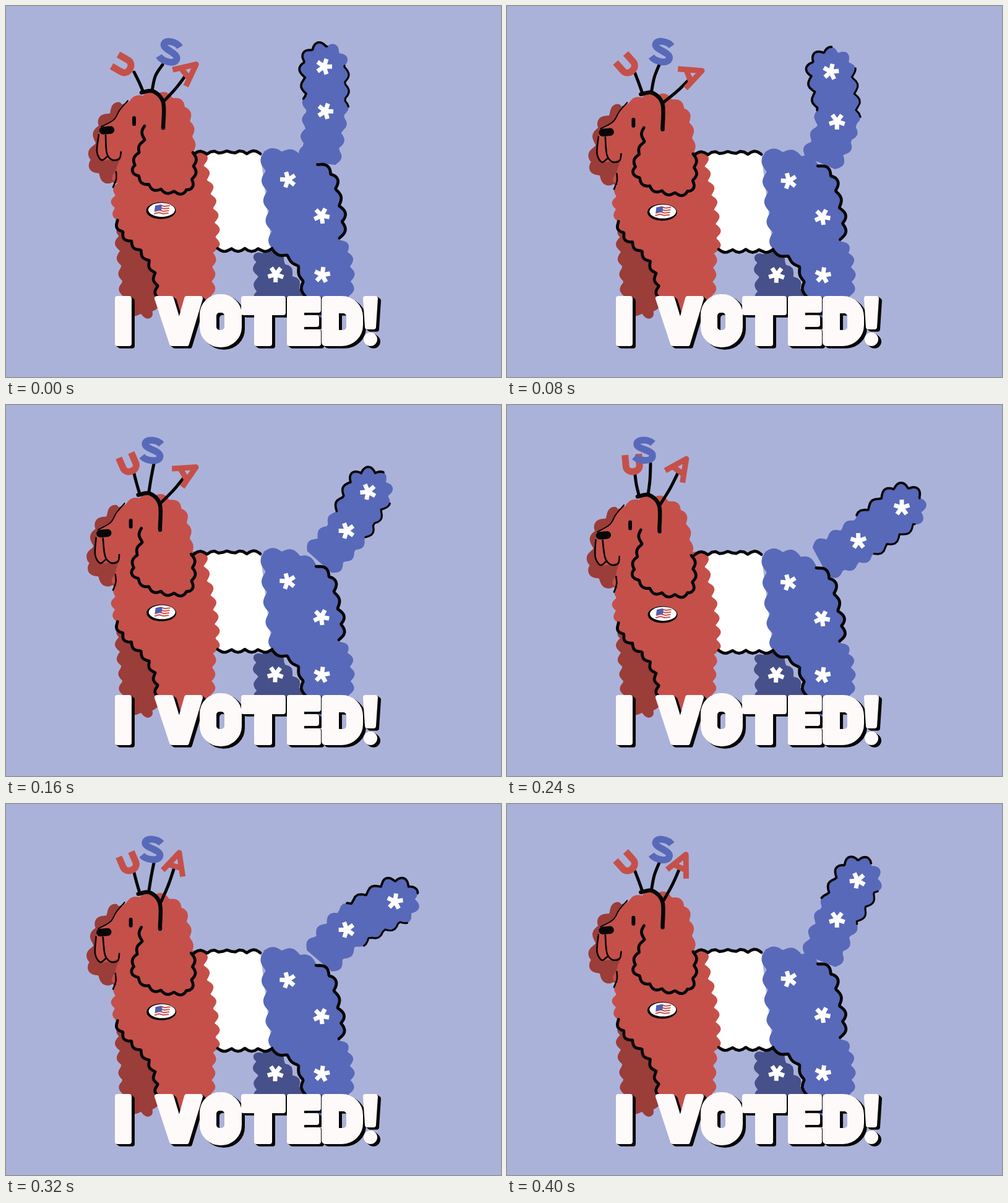
An HTML page with a canvas for the animation above (480 ms loop, 800 by 600 pixels).

```html
<!DOCTYPE html>
<html lang="en">
<head>
<meta charset="utf-8">
<title>I VOTED!</title>
<style>
html, body { margin: 0; width: 100%; height: 100%; overflow: hidden; background: #abb2d9; }
canvas { display: block; }
</style>
</head>
<body>
<canvas id="stage" width="800" height="600" role="img" aria-label="I VOTED! A dog in red, white and blue wags its tail"></canvas>
<script>
const ctx = document.getElementById('stage').getContext('2d');
const INK = '#070707', RED = '#c5504a', MAROON = '#9b3d39', BLUE = '#5869b9', NAVY = '#46508a';
const STEP = 80, STEPS = 6, { PI, sin, cos } = Math;
const unit = v => Math.max(0, Math.min(1, v));

// smooth curve through a few points
function curve(keys, closed = false) {
  const n = keys.length, out = [];
  const at = i => keys[closed ? (i + n) % n : Math.max(0, Math.min(n - 1, i))];
  for (let i = 0; i < (closed ? n : n - 1); i++) {
    const [a, b, c, d] = [-1, 0, 1, 2].map(k => at(i + k));
    for (let t = 0; t < 0.99; t += 0.05) {
      out.push([0, 1].map(k => b[k] + t * (c[k] - a[k]) / 2
        + t * t * (a[k] - 2.5 * b[k] + 2 * c[k] - d[k] / 2)
        + t * t * t * (1.5 * (b[k] - c[k]) + (d[k] - a[k]) / 2)));
    }
  }
  if (!closed) out.push(keys[n - 1]);
  return out;
}

function heading(list, i) {
  const a = list[Math.max(0, i - 1)], b = list[Math.min(list.length - 1, i + 1)];
  return Math.atan2(b[1] - a[1], b[0] - a[0]);
}

// shift every point to the left of the direction of travel
const offset = (list, amount) => list.map(([x, y], i) => {
  const a = heading(list, i), d = amount(i);
  return [x + d * sin(a), y - d * cos(a)];
});

// woolly edge: round lobes of even length along a curve
function fluff(list, lobe, depth) {
  const run = [0];
  for (let i = 1; i < list.length; i++)
    run.push(run[i - 1] + Math.hypot(list[i][0] - list[i - 1][0], list[i][1] - list[i - 1][1]));
  const total = run[run.length - 1], count = Math.round(total / lobe);
  return offset(list, i => depth * (Math.abs(sin(PI * count * run[i] / total)) - 0.6));
}

const keys = text => text.split(', ').map(pair => pair.split(' ').map(Number));
const plain = text => curve(keys(text));
const wool = (text, lobe = 21, depth = 6) => fluff(plain(text), lobe, depth);
const ball = (text, lobe = 24, depth = 7) => fluff(curve(keys(text), true), lobe, depth);

const body = {
  backLeg: ball('484 480, 408 475, 404 440, 403 404, 440 400'),
  frontLeg: ball('240 497, 205 498, 188 482, 184 430, 180 364, 215 385, 246 430'),
  chest: wool('244 474, 239 436, 222 404, 190 372, 177 348'),
  breast: wool('177 348, 172 318, 178 285'),
  redSide: wool('322 234, 325 265, 335 305, 342 355, 342 397', 24, 8),
  redLeg: wool('338 399, 336 430, 335 468, 326 490'),
  back: wool('303 237, 411 236', 24, 5),
  belly: wool('430 395, 342 395', 22, 5),
  blueSide: wool('430 397, 425 365, 420 325, 416 280, 414 234', 31, 8),
  croup: wool('414 234, 445 232, 480 239, 506 252', 32),
  rump: wool('506 253, 530 273, 539 310, 547 345, 543 376', 28, 7),
  hip: wool('543 376, 556 398, 561 440, 558 470', 28, 7),
  foot: plain('556 485, 530 504, 500 505, 482 488'),
  thigh: wool('481 470, 474 430, 457 408, 430 397', 22, 5)
};

const head = {
  farEar: ball('205 180, 190 250, 176 288, 147 273, 133 250, 141 222, 147 190, 166 170, 187 155', 28),
  bridge: plain('154 195, 174 184, 184 168, 197 153'),
  crown: wool('197 153, 240 138, 286 156, 301 190, 305 237', 25, 5),
  jaw: plain('305 237, 270 290, 178 285, 179 262, 184 246, 172 248, 154 249, 148 235, 150 206'),
  ear: wool('305 237, 305 270, 294 299, 260 301, 228 290, 206 266, 211 240, 221 217, 221 194', 23, 5),
  lip: plain('150 208, 147 235, 154 249, 163 244'),
  mouth: plain('161 209, 163 238, 172 249, 183 247, 186 236'),
  throat: plain('178 268, 178 280, 173 293'),
  band: plain('219 140, 238 138, 254 156, 254 197')
};

const glyphs = {
  U: new Path2D('M-11-16L-11 2C-11 15 11 15 11 2L11-16'),
  S: new Path2D('M13-12C6-18-13-18-13-9C-13 0 14-2 14 8C14 19-8 18-15 12'),
  A: new Path2D('M-17 18L0-17L17 18M-11 6L11 6')
};

// slogan blocks are inset by ROUND, which a round stroke adds back
const ROUND = 4;
const solid = new Path2D('M244 473H267L280 516L292 473H314L292 546H268Z M581 473H597L594 519H584Z');
const hollow = new Path2D();
const bar = (x, y, w, h) => solid.rect(x + ROUND, y + ROUND, w - 2 * ROUND, h - 2 * ROUND);
const ring = (x, y, w, h, radii, grow) =>
  hollow.roundRect(x - grow, y - grow, w + 2 * grow, h + 2 * grow, radii);
bar(176, 469, 27, 81);
bar(380, 469, 72, 31);
bar(401, 469, 29, 81);
bar(454, 469, 28, 81);
for (const [y, w, h] of [[469, 55, 27], [500, 52, 19], [523, 55, 27]]) bar(454, y, w, h);
ring(313, 466, 68, 86, 29, -ROUND);
ring(340, 496, 13, 28, 9, ROUND);
ring(510, 469, 67, 81, [2, 30, 30, 2], -ROUND);
ring(538, 497, 12, 27, [2, 9, 9, 2], ROUND);
solid.moveTo(596, 539);
solid.arc(589, 539, 7, 0, 2 * PI);

const bodyWarp = p => ([x, y]) => {
  const k = p * 4 * unit((x - 460) / 50) * unit((400 - y) / 80);
  return [x - k, y + k + (y < 470 ? p * 6 * Math.max(0, sin(PI * (y - 200) / 270)) : 0)];
};

const headWarp = p => ([x, y]) =>
  [x - 8 * p * unit((290 - y) / 100), y + p * (7 + (270 - x) * 0.025)];

function trace(list) {
  ctx.beginPath();
  for (const point of list) ctx.lineTo(...point);
}

function fill(color, ...edges) {
  trace(edges.flat());
  ctx.fillStyle = color;
  ctx.fill();
}

function line(list, width, color = INK) {
  trace(list);
  ctx.lineWidth = width;
  ctx.strokeStyle = color;
  ctx.stroke();
}

function placed(x, y, deg, draw) {
  ctx.save();
  ctx.translate(x, y);
  ctx.rotate(deg * PI / 180);
  draw();
  ctx.restore();
}

function star(x, y, deg) {
  placed(x, y, deg, () => {
    ctx.strokeStyle = '#fff';
    ctx.lineWidth = 7;
    ctx.lineCap = 'butt';
    ctx.beginPath();
    for (let a = -PI / 2; a < 4.5; a += PI * 0.4) {
      ctx.moveTo(0, 0);
      ctx.lineTo(13 * cos(a), 13 * sin(a));
    }
    ctx.stroke();
  });
}

function letter(name, x, y, deg, color, width) {
  placed(x, y, deg, () => {
    ctx.strokeStyle = color;
    ctx.lineWidth = width;
    ctx.lineCap = 'butt';
    ctx.stroke(glyphs[name]);
  });
}

// the tip swings a little behind the root
function drawTail(p, c, s) {
  const mid = [516 + 52 * p, 170 + 50 * p];
  const tip = [576 - 62 * c - 25 * s, 132 - 34 * c - 10 * s];
  const spine = curve([[506, 254], mid, tip]), last = spine.length - 1;
  const width = i => 31 + 6 * i / last;
  const end = heading(spine, last), cap = [];
  for (let a = -PI / 2; a < PI / 2; a += 0.06)
    cap.push([tip[0] + 37 * cos(end + a), tip[1] + 37 * sin(end + a)]);
  const left = offset(spine, width), right = offset(spine, i => -width(i)).reverse();
  const rim = fluff([...left, ...cap, ...right], 27, 8);
  const part = (from, to) => rim.slice(from * rim.length | 0, to * rim.length | 0);
  fill(BLUE, rim);
  line(part(0.19, 0.53), 3.8);
  line(part(0.7, 0.84), 3.2);
  star(...mid, 20 + 50 * p);
  star(...tip, end * 180 / PI + 110);
}

function drawSticker(p) {
  placed(251 + p, 330 + 8 * p, 0, () => {
    const oval = (x, y, rx, ry, color) => {
      ctx.beginPath();
      ctx.ellipse(x, y, rx, ry, 0, 0, 7);
      ctx.fillStyle = color;
      ctx.fill();
    };
    oval(-0.5, 1, 24, 13.5, INK);
    oval(0.5, -0.3, 21.5, 11.2, '#fff');
    for (let i = 0; i < 4; i++) {
      const y = i * 4 - 7, x = -i * 0.7;
      line([[x - 9, y + 1], [x - 2, y - 1], [x + 5, y + 1], [x + 13, y]], 2, '#d3544f');
    }
    fill('#4c5fb4', [[-10, -7], [1, -8.5], [0, 0], [-11, 2]]);
  });
}

const warped = (parts, warp) =>
  Object.fromEntries(Object.entries(parts).map(([name, list]) => [name, list.map(warp)]));

function drawBody(p) {
  const b = warped(body, bodyWarp(p));
  fill(NAVY, b.backLeg);
  fill(MAROON, b.frontLeg);
  fill('#fff', b.back, b.belly);
  fill(BLUE, b.blueSide, b.croup, b.rump, b.hip, b.foot, b.thigh);
  fill(RED, b.chest, b.breast, [[250, 240]], b.redSide, b.redLeg, [[300, 499], [262, 497]]);
  for (const edge of [b.chest, b.back, b.belly, b.thigh, b.rump]) line(edge, 4.8);
  for (const [x, y, a] of [[456, 281, -15], [510, 339, 28], [511, 435, 8], [436, 434, 38]])
    star(x - p, y + p * (y < 400 ? 6 : 2), a);
  drawSticker(p);
}

function drawHead(p) {
  const warp = headWarp(p), h = warped(head, warp);
  fill(MAROON, h.farEar);
  fill(RED, h.bridge, h.crown, h.jaw);
  fill(RED, h.ear);
  line(h.bridge, 2);
  line(h.ear, 4.8);
  for (const edge of [h.lip, h.mouth, h.throat]) line(edge, 2.7);
  const [nx, ny] = warp([163, 201]), [ex, ey] = warp([207, 186]);
  line([[nx - 6, ny + 0.5], [nx + 6, ny - 0.5]], 12.5);
  line([[ex, ey - 5], [ex, ey + 5]], 6);
}

function drawAntennae(p, c, s) {
  const warp = headWarp(p);
  const ax = 287 + 7 * c + 10 * s, ay = 103 + 2 * c + 8 * s;
  const wire = (from, bend, to) => {
    const [x, y] = warp(from);
    line(curve([[x, y], [(x + to[0]) / 2 + bend, (y + to[1]) / 2 + bend], to]), 5);
  };
  wire([221, 137], 1 - 2 * p, [207, 107 + 6 * p]);
  wire([236, 137], 4 * p - 3, [253 - 21 * p, 95]);
  wire([256, 153], 1, [ax - 2, ay + 5]);
  line(head.band.map(warp), 6.5);
  letter('U', 190 + 13 * p, 96, 55 * p - 60, RED, 11);
  letter('S', 265 - 43 * p, 74 - p, 18 - 13 * p, BLUE, 11);
  letter('A', ax, ay, 43 + 8 * c + 25 * s, RED, 9);
}

function drawSlogan() {
  const layer = (x, y, color) => placed(x, y, 0, () => {
    ctx.fillStyle = ctx.strokeStyle = color;
    ctx.lineWidth = 2 * ROUND;
    ctx.fill(solid);
    ctx.fill(hollow, 'evenodd');
    ctx.stroke(solid);
    ctx.stroke(hollow);
  });
  for (let i = 5; i > 0; i--) layer(i, i * 0.75, INK);
  layer(0, 0, '#fffafa');
}

function render(now) {
  const step = Math.floor(now / STEP) % STEPS;
  const p = 1 - Math.abs(3 - step) / 3;
  const c = cos(step * PI / 3), s = sin(step * PI / 3);
  ctx.lineCap = ctx.lineJoin = 'round';
  ctx.fillStyle = '#abb2d9';
  ctx.fillRect(0, 0, 800, 600);
  drawTail(p, c, s);
  drawBody(p);
  drawHead(p);
  drawAntennae(p, c, s);
  drawSlogan();
}

const start = performance.now();
function tick() {
  render(performance.now() - start);
  requestAnimationFrame(tick);
}
tick();
</script>
</body>
</html>
```
